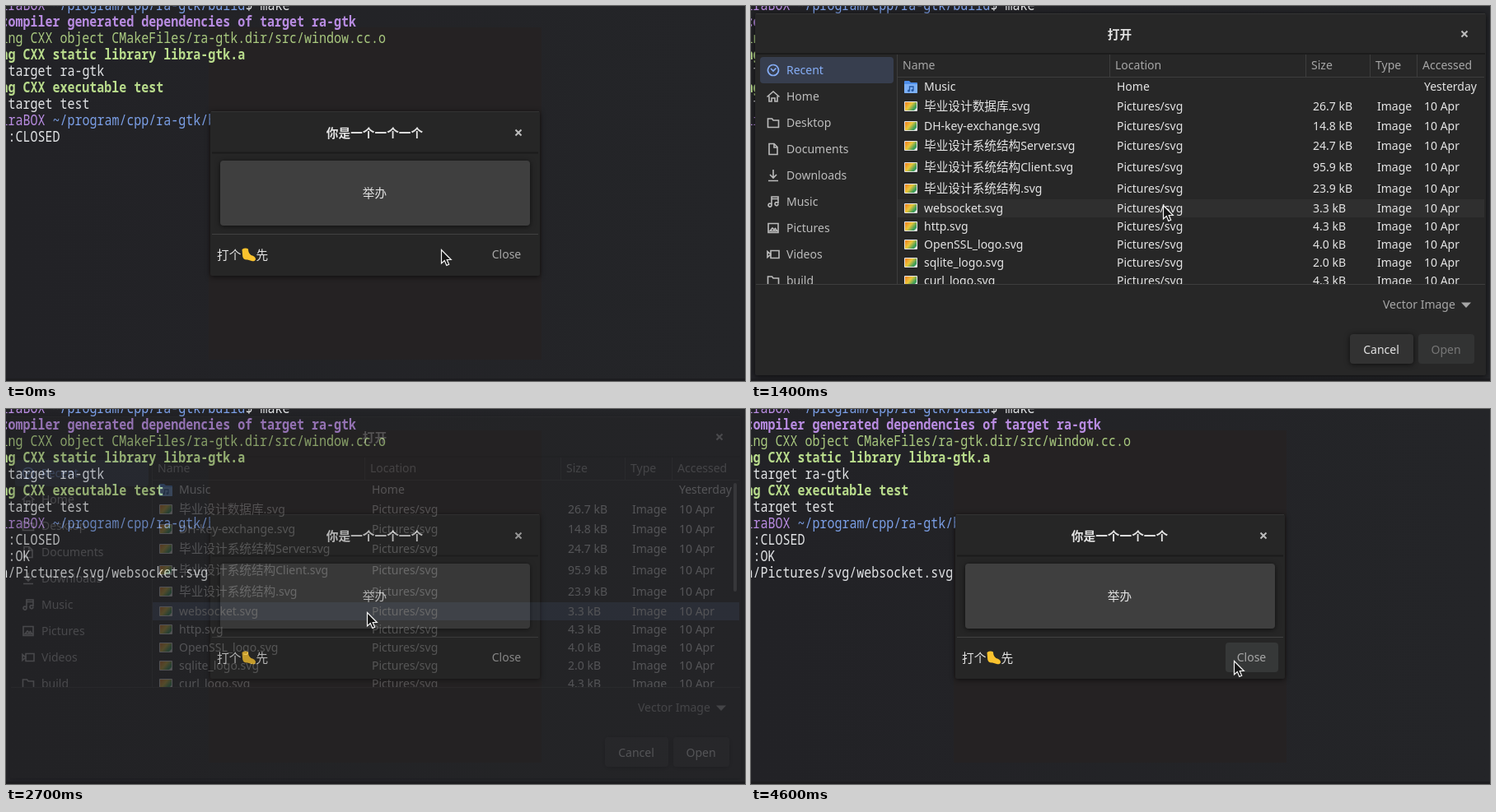
These frames come from a looping animation (897 by 456 pixels, 5.3 s). An HTML page:

```html
<!DOCTYPE html>
<html lang="zh-CN">
<head>
<meta charset="utf-8">
<title>File chooser</title>
<style>
html, body { margin: 0; width: 100%; height: 100%; overflow: hidden; background: #232427; }
svg { display: block; width: 897px; height: 456px; }
text { font: 14px "Noto Sans", "Noto Sans CJK SC", "Noto Sans CJK", sans-serif; fill: #e4e4e4; white-space: pre; }
.cjk { font-size: 14.67px; font-family: "Noto Sans CJK SC", "Noto Sans CJK", sans-serif; }
.title { font-weight: 700; text-anchor: middle; }
.mid { text-anchor: middle; }
.btn { font-weight: 500; text-anchor: middle; }
.dim { fill: #a6a6a6; }
#term text { font: 15px "Noto Sans Mono", "DejaVu Sans Mono", monospace; }
#term .b { font-weight: 700; }
.window { filter: drop-shadow(0 1px 3px rgba(0,0,0,.65)); }
.icon { fill: none; stroke: #b9b9b9; stroke-width: 1.6; }

/* Every change is a hard step on a 5300 ms loop. */
.anim { animation: 5.3s step-end infinite; }
#cursor { animation-name: cursor; }
#ripple { animation-name: ripple; }
#chooser { animation-name: chooser; }
#hover { animation-name: hover; }
#picked, #ready { animation-name: picked; }
#tip { animation-name: tip; }
#bar { animation-name: bar; }
#output { animation-name: output; }
#closeHover { animation-name: closeHover; }
#title { animation-name: backdrop; }

@keyframes cursor {
  0% { transform: translate(528px, 296px); }
  7.54% { transform: translate(522px, 286px); }
  9.43% { transform: translate(506px, 256px); }
  11.32% { transform: translate(500px, 242px); }
  30.18% { transform: translate(484px, 244px); }
  32.07% { transform: translate(452px, 247px); }
  33.96% { transform: translate(441px, 247px); }
  35.84% { transform: translate(438px, 247px); }
  71.69% { transform: translate(441px, 251px); }
  73.58% { transform: translate(449px, 262px); }
  75.47% { transform: translate(460px, 275px); }
  77.35% { transform: translate(473px, 287px); }
  79.24% { transform: translate(484px, 295px); }
  81.13% { transform: translate(491px, 300px); }
  83.01% { transform: translate(520px, 304px); }
  84.90% { transform: translate(566px, 306px); }
  86.79%, 100% { transform: translate(586px, 306px); }
}
@keyframes ripple {
  0% { r: 0; opacity: 0; }
  16.98% { r: 56px; opacity: 1; }
  18.86% { r: 126px; opacity: 1; }
  20.75% { r: 196px; opacity: .8; }
  22.64% { r: 196px; opacity: .25; }
  24.52%, 100% { r: 0; opacity: 0; }
}
@keyframes chooser {
  0% { opacity: 0; }
  20.75% { opacity: .15; }
  22.64% { opacity: .46; }
  24.52% { opacity: .8; }
  26.41% { opacity: 1; }
  49.05% { opacity: .7; }
  50.94% { opacity: .25; }
  52.83%, 100% { opacity: 0; }
}
@keyframes backdrop {
  0% { opacity: 1; }
  20.75% { opacity: .7; }
  50.94%, 100% { opacity: 1; }
}
@keyframes hover { 0% { opacity: 0; } 24.52%, 100% { opacity: 1; } }
@keyframes picked { 0% { opacity: 0; } 43.39%, 100% { opacity: 1; } }
@keyframes tip {
  0% { opacity: 0; }
  33.96% { opacity: .62; }
  35.84% { opacity: .97; }
  45.28%, 100% { opacity: 0; }
}
@keyframes bar {
  0% { opacity: 0; }
  30.18% { opacity: .5; }
  32.07% { opacity: .9; }
  39.62%, 100% { opacity: 1; }
}
@keyframes output { 0% { opacity: 0; } 49.05%, 100% { opacity: 1; } }
@keyframes closeHover {
  0% { opacity: 0; }
  84.90% { opacity: .5; }
  86.79%, 100% { opacity: 1; }
}
</style>
</head>
<body>
<svg viewBox="0 0 897 456">
  <defs>
    <linearGradient id="desk"><stop stop-color="#222226"/><stop offset="1" stop-color="#242528"/></linearGradient>
    <linearGradient id="photo" x2="1" y2=".6">
      <stop offset=".1" stop-color="#f08a24"/><stop offset=".5" stop-color="#e9c63a"/><stop offset=".9" stop-color="#3f9e5a"/>
    </linearGradient>
    <clipPath id="btnClip"><rect x="260" y="188" width="376" height="79" rx="4"/></clipPath>
    <clipPath id="listClip"><rect x="5" y="59" width="887" height="279"/></clipPath>
    <path id="x" d="M-3.5-3.5 3.5 3.5M3.5-3.5-3.5 3.5" stroke="#bdbdbd" stroke-width="2"/>
  </defs>

  <rect width="897" height="456" fill="url(#desk)"/>
  <rect x="246" y="26" width="404" height="404" fill="#252223"/>
  <rect y="453" width="897" height="3" fill="#1d1d20"/>
  <g id="term"></g>

  <g id="dialog">
    <rect class="window" x="248" y="128" width="400" height="200" rx="2" fill="#262626"/>
    <path d="M249 128.5H647" stroke="#333"/>
    <path d="M250 178.5H646" stroke="#1b1b1b" stroke-width="2"/>
    <text id="title" class="anim title cjk" x="447.5" y="160">你是一个一个一个</text>
    <use href="#x" x="622" y="154"/>
    <rect class="window" x="260" y="188" width="376" height="79" rx="4" fill="#3f3f3f"/>
    <g clip-path="url(#btnClip)"><circle id="ripple" class="anim" cx="448" cy="227.5" r="0" fill="#565656"/></g>
    <text class="mid cjk" x="447.5" y="233">举办</text>
    <path d="M250 277.5H646" stroke="#414141"/>
    <text class="cjk" x="256" y="308">打个</text>
    <path d="M286.5 296q4-2.5 7.5-.5 0 5 3.5 7.500 5 1 5.5 4.500 0 3-4 2.800l-6-1.800q-5 .5-5.800-4Z" fill="#f9c22e"/>
    <text class="cjk" x="303.5" y="308">先</text>
    <rect id="closeHover" class="anim" x="576" y="284" width="64" height="36" rx="4" fill="#363838"/>
    <text class="btn dim" x="607.5" y="307">Close</text>
  </g>

  <g id="chooser" class="anim">
    <rect class="window" x="5" y="9" width="887" height="440" rx="2" fill="#272727"/>
    <path d="M6 9.5H891" stroke="#353535"/>
    <text class="title cjk" x="447.5" y="40">打开</text>
    <use href="#x" x="866" y="34"/>
    <path d="M6 58H891" stroke="#1c1c1c" stroke-width="2"/>
    <path d="M177.5 59V338M435.5 59V86M673.5 59V86M751.5 59V86M808.5 59V86M178 86.5H890M6 338.5H891" stroke="#3d3d3d"/>
    <rect x="11" y="62" width="162" height="32" rx="4" fill="#373e4e"/>
    <rect id="hover" class="anim" x="178" y="235" width="712" height="22" fill="#2f2f2f"/>
    <rect id="picked" class="anim" x="178" y="235" width="712" height="22" fill="#434f66"/>
    <g clip-path="url(#listClip)">
      <g id="places"></g>
      <g id="files"></g>
    </g>
    <rect id="bar" class="anim" x="883" y="90" width="4" height="132" rx="2" fill="#707070"/>
    <text class="dim" x="767" y="368">Vector Image</text>
    <path d="M862 360.5h12l-6 6.5Z" fill="#a6a6a6"/>
    <rect class="window" x="727" y="399" width="77" height="36" rx="4" fill="#323232"/>
    <text class="btn" x="765" y="423">Cancel</text>
    <rect x="810" y="399" width="68" height="36" rx="4" fill="#323333"/>
    <text class="btn" x="843.5" y="423" style="fill:#777">Open</text>
    <g id="ready" class="anim">
      <rect class="window" x="810" y="399" width="68" height="36" rx="4" fill="#323232"/>
      <text class="btn" x="843.5" y="423">Open</text>
    </g>
    <g id="tip" class="anim">
      <rect x="317" y="256" width="376" height="33" rx="4" fill="#525252"/>
      <text class="mid" x="504" y="277">/home/fenmira/Pictures/svg/websocket.svg</text>
    </g>
  </g>

  <path id="cursor" class="anim" d="M.5.5V17L4.3 13.6 6.8 19.4 9.7 18.2 7.2 12.5H12.3Z" fill="#151515" stroke="#f4f4f4" stroke-width="1.2"/>
</svg>
<script>
const $ = id => document.getElementById(id);
const text = (x, y, s, attrs = '') => `<text x="${x}" y="${y}" ${attrs}>` +
  s.replace(/[\u4e00-\u9fff]+/g, run => `<tspan class="cjk">${run}</tspan>`) + '</text>';

// Terminal: 9 px cells, 20 px rows, tall narrow letters.
const line = (row, col, s, color, cls = '') =>
  `<g transform="translate(${2.5 + 9 * col} ${4.5 + 20 * row}) scale(1 1.2)">` +
  text(0, 0, s, `class="${cls}" style="fill:${color}"`) + '</g>';
const purple = '#b98ce2', green = '#b9dc8c', blue = '#7b9fe6', white = '#e2e4e6';
const prompt = row => line(row, -1, 'iraBOX', purple) +
  line(row, 6, '~/program/cpp/ra-gtk/build', blue) + line(row, 32, '$ make', white);
$('term').innerHTML =
  prompt(0) +
  line(1, -1, 'compiler generated dependencies of target ra-gtk', purple, 'b') +
  line(2, -1, 'ing CXX object CMakeFiles/ra-gtk.dir/src/window.cc.o', '#a9c97f') +
  line(3, -1, 'ng CXX static library libra-gtk.a', green, 'b') +
  line(4, 0, 'target ra-gtk', white) +
  line(5, -1, 'ng CXX executable test', green, 'b') +
  line(6, 0, 'target test', white) +
  prompt(7) +
  line(8, -1, '::CLOSED', white) +
  '<g id="output" class="anim">' +
  line(9, -1, '::OK', white) +
  line(10, -1, 'a/Pictures/svg/websocket.svg', white) + '</g>';

const folder = 'M1.5 3V13.5H14.5V5H8L6.5 3Z';
const places = [
  ['Recent', 'M8 1.5A6.5 6.5 0 1 1 7.9 1.5M5 6 8 9 11.5 5.5'],
  ['Home', 'M.5 8.5 8 2 15.5 8.5M3 7.5V14H6V10H10V14H13V7.5'],
  ['Desktop', folder],
  ['Documents', 'M3 1.5V14.5H13V5.5L9 1.5ZM9 1.5V6H13'],
  ['Downloads', 'M8 1V11M4 7 8 11 12 7M2 14.5H14'],
  ['Music', 'M6 12V2H14V10M6 4.5H14M6 12A2 2 0 1 1 5.9 11.5M14 10.5A2 2 0 1 1 13.9 10'],
  ['Pictures', 'M2 2.5H14V13.5H2ZM4 11.5 7 8 9 10 10.5 8.5 12.5 11.5Z'],
  ['Videos', 'M5 3.5H15V12.5H5ZM5 8 1 4.5V11.5Z'],
  ['build', folder]
];
$('places').innerHTML = places.map(([name, d], i) => {
  const y = 78 + 32 * i, c = i ? '#bcbcbc' : '#86aef6';
  return `<path class="icon" transform="translate(19 ${y - 8})" d="${d}" style="stroke:${c}"/>` +
    text(43, y + 5, name, `style="fill:${c}"`);
}).join('');

const heads = ['Name', 'Location', 'Size', 'Type', 'Accessed'];
const headX = [184, 442, 680, 758, 815];
const colX = [210, 444, 682, 760, 817];
const files = [
  [122, '毕业设计数据库', '26.7'], [146, 'DH-key-exchange', '14.8'],
  [170, '毕业设计系统结构Server', '24.7'], [196, '毕业设计系统结构Client', '95.9'],
  [222, '毕业设计系统结构', '23.9'], [246, 'websocket', '3.3'], [268, 'http', '4.3'],
  [290, 'OpenSSL_logo', '4.0'], [312, 'sqlite_logo', '2.0'], [334, 'curl_logo', '4.3']
];
const cells = (y, values) => values.map((v, i) => text(colX[i], y + 5, v)).join('');
const thumb = y => `<rect x="186" y="${y - 6}" width="16" height="12" rx="1" fill="#e4e4e4"/>` +
  `<path d="M187 ${y - 5}h14v7l-3 3h-11Z" fill="url(#photo)"/>`;
$('files').innerHTML =
  heads.map((h, i) => text(headX[i], 77, h, 'class="dim"')).join('') +
  '<path d="M186 92q0-1 1-1h5l2 2h7q1 0 1 1v11q0 1-1 1h-14q-1 0-1-1Z" fill="#4d8de8"/>' +
  '<path d="M186 95h16v10q0 1-1 1h-14q-1 0-1-1Z" fill="#7db0f5"/>' +
  '<path d="M192.5 103V98h4.5v4.5" fill="none" stroke="#24579f" stroke-width="1.3"/>' +
  '<circle cx="191.5" cy="103" r="1.5" fill="#24579f"/><circle cx="196" cy="102.5" r="1.5" fill="#24579f"/>' +
  cells(98, ['Music', 'Home', '', '', 'Yesterday']) +
  files.map(([y, name, size]) => thumb(y) +
    cells(y, [name + '.svg', 'Pictures/svg', size + ' kB', 'Image', '10 Apr'])).join('');
</script>
</body>
</html>
```
